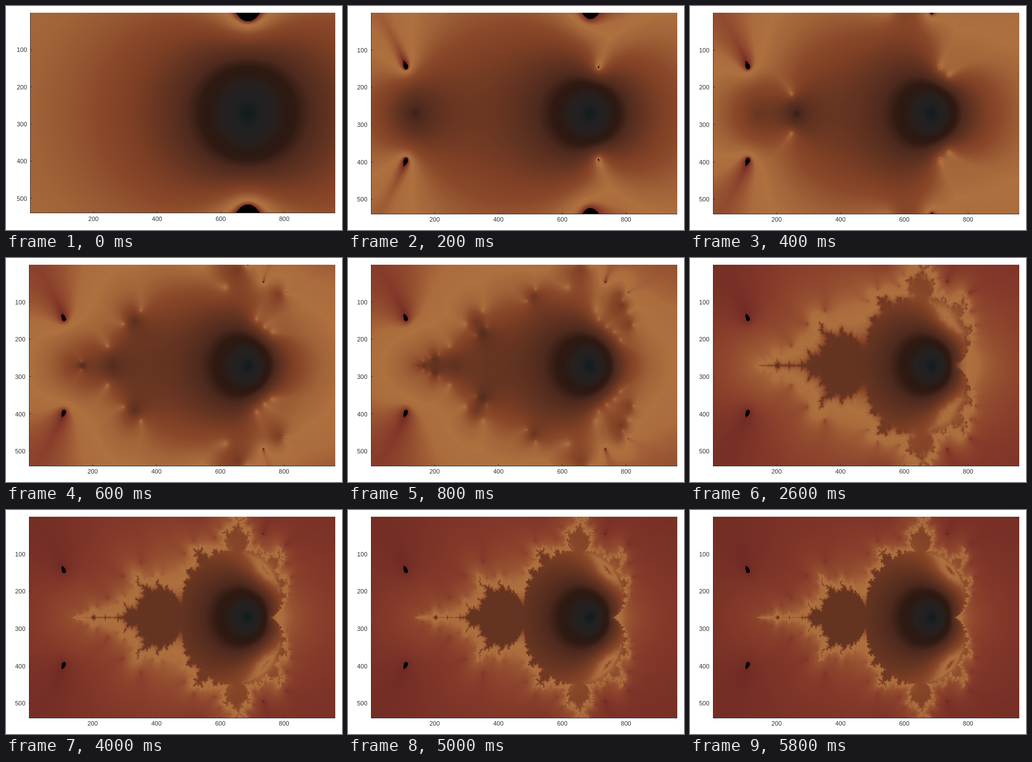
Animation of 600 by 400 pixels, one loop 6200 ms. Source, as an HTML page with a canvas:

```html
<!DOCTYPE html>
<html lang="en">
<head>
<meta charset="utf-8">
<title>Mandelbrot set, mean curvature</title>
<style>
  html, body { margin: 0; width: 100%; height: 100%; overflow: hidden; background: #fff; }
  #stage { position: relative; width: 600px; height: 400px; overflow: hidden; }
  canvas, svg { position: absolute; left: 0; top: 0; }
  text { font: 11px "Liberation Sans", Arial, Helvetica, sans-serif; fill: #333; }
  path { stroke: #333; stroke-width: 1; fill: none; }
</style>
</head>
<body>
<div id="stage">
  <canvas id="view" width="600" height="400"></canvas>
  <svg id="axes" width="600" height="400" viewBox="0 0 600 400"></svg>
</div>
<script>
const STEPS = 30, STEP_MS = 200, LOOP_MS = 6200;
const COLS = 960, ROWS = 540, HALF_PI = Math.PI / 2;

// The first picture has slightly wider margins than the rest.
const FIRST = { x: 43, y: 12, w: 545, h: 358, textX: 37.5, textY: 384 };
const REST = { x: 41, y: 12, w: 547, h: 360, textX: 34.5, textY: 385 };

// value, red, green, blue
const STOPS = [
  [0, 16, 28, 28], [0.08, 24, 30, 31], [0.16, 34, 32, 33], [0.3, 38, 32, 31],
  [0.42, 44, 25, 17], [0.5, 47, 26, 18], [0.62, 78, 41, 30], [0.785, 100, 52, 33],
  [0.95, 128, 64, 37], [1.05, 139, 73, 42], [1.19, 160, 98, 56], [1.3, 174, 112, 62],
  [1.38, 171, 108, 61], [1.45, 149, 79, 48], [1.52, 129, 55, 41], [HALF_PI, 112, 42, 36]
];
const LUT_SIZE = 2048;
const BLACK = 0xff000000;

const lut = Uint32Array.from({ length: LUT_SIZE + 1 }, (_, i) => {
  const v = i / LUT_SIZE * HALF_PI;
  let k = 1;
  while (k < STOPS.length - 1 && STOPS[k][0] < v) k++;
  const a = STOPS[k - 1], b = STOPS[k];
  const t = (v - a[0]) / (b[0] - a[0]);
  const mix = c => Math.round(a[c] + (b[c] - a[c]) * t);
  return (BLACK | mix(3) << 16 | mix(2) << 8 | mix(1)) >>> 0;
});

// Modulus of the complex arctangent
function absAtan(x, y) {
  const re = Math.atan2(2 * x, 1 - x * x - y * y) / 2;
  const im = Math.log((x * x + (y + 1) ** 2) / (x * x + (y - 1) ** 2)) / 4;
  return Math.sqrt(re * re + im * im);
}

// Running mean of |atan(z[n] + z[n-1])|, one image per iteration
function build(box, count) {
  const { w, h } = box, half = Math.ceil(h / 2), size = w * half;
  const zr = new Float64Array(size), zi = new Float64Array(size);
  const excess = new Float64Array(size), escaped = new Uint8Array(size);
  const grid = (i, n, cells) => Math.floor((i + 0.5) / n * cells) / (cells - 1);
  const cr = Float64Array.from({ length: w }, (_, i) => -2.5 + 3.5 * grid(i, w, COLS));
  const ci = Float64Array.from({ length: half }, (_, j) => 1 - 2 * grid(j, h, ROWS));
  const images = [];

  for (let n = 1; n <= count; n++) {
    const image = new ImageData(w, h);
    const out = new Uint32Array(image.data.buffer);
    for (let j = 0, p = 0; j < half; j++) {
      const mirror = (h - 1 - j) * w;
      for (let i = 0; i < w; i++, p++) {
        if (!escaped[p]) {
          const a = zr[p], b = zi[p];
          const re = a * a - b * b + cr[i], im = 2 * a * b + ci[j];
          const term = absAtan(re + a, im + b);
          excess[p] += Math.min(term, 40) - HALF_PI;
          zr[p] = re;
          zi[p] = im;
          if (re * re + im * im > 1e18) escaped[p] = 1;
        }
        const e = excess[p];
        const v = Math.max(0, 1 + e / n / HALF_PI);
        const color = e > 1e-9 ? BLACK : lut[Math.min(LUT_SIZE, Math.round(v * LUT_SIZE))];
        out[p] = out[mirror + i] = color;
      }
    }
    images.push(image);
  }
  return images;
}

function axes({ x, y, w, h, textX, textY }) {
  const left = x + 0.5, bottom = y + h - 0.5;
  let line = `M${left} ${y}V${bottom}H${x + w}`, labels = "";
  for (let v = 200; v < COLS; v += 200) {
    const px = x + (v - 0.5) / COLS * w;
    line += `M${px} ${bottom}v-3`;
    labels += `<text x="${px}" y="${textY}" text-anchor="middle">${v}</text>`;
  }
  for (let v = 100; v < ROWS; v += 100) {
    const py = y + (v - 0.5) / ROWS * h;
    line += `M${left} ${py}h3`;
    labels += `<text x="${textX}" y="${py + 4.4}" text-anchor="end">${v}</text>`;
  }
  return `<path d="${line}"/>${labels}`;
}

const ctx = document.getElementById("view").getContext("2d");
const overlay = document.getElementById("axes");
const first = build(FIRST, 1)[0];
const images = build(REST, STEPS);
let shown = -1;

function show(step) {
  if (step === shown) return;
  const box = step ? REST : FIRST;
  ctx.fillStyle = "#fff";
  ctx.fillRect(0, 0, 600, 400);
  ctx.putImageData(step ? images[step] : first, box.x, box.y);
  if (shown < 1 || !step) overlay.innerHTML = axes(box);
  shown = step;
}

show(0);
const start = performance.now();
function tick() {
  const t = (performance.now() - start) % LOOP_MS;
  show(Math.min(STEPS - 1, Math.floor(t / STEP_MS)));
  requestAnimationFrame(tick);
}
requestAnimationFrame(tick);
</script>
</body>
</html>
```
